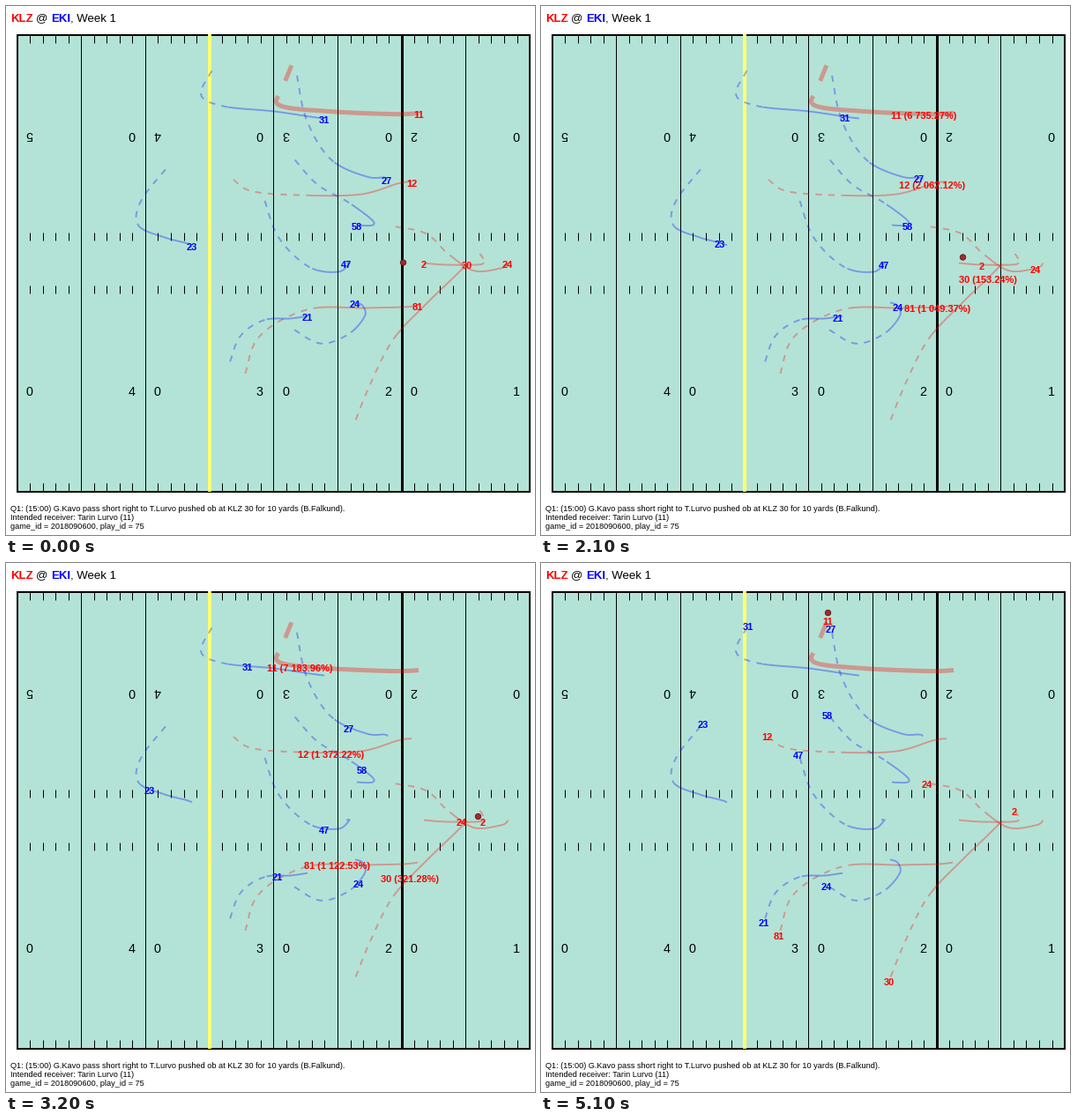
Recreate the animation shown at these times as a matplotlib script. Size 600 by 600 pixels, loop 6200 ms.

```python
import numpy as np
import matplotlib.pyplot as plt
from matplotlib.animation import FuncAnimation
from matplotlib.patches import Circle, Rectangle

SIZE, DPI = 600, 100
FRAMES, STEP = 62, 100
SNAP, START, THROW, LAST = 10, 12, 35, 51
KEYS = (START, 21, 28, 36, 44, LAST)    # steps of the players' key points
RED, BLUE = "#ff0000", "#0000ff"
GRASS, YELLOW, BROWN = "#b3e3d6", "#ffff73", "#a52a2a"
LEFT, RIGHT, TOP, BOTTOM = 12.5, 594, 33, 551
YARD = 14.54
LABEL_DROP = 1.5                        # labels sit a little below the track

plt.rcParams["font.family"] = "Liberation Sans"
fig = plt.figure(figsize=(SIZE / DPI, SIZE / DPI), dpi=DPI, facecolor="white")
ax = fig.add_axes([0, 0, 1, 1])
ax.set_xlim(0, SIZE)
ax.set_ylim(SIZE, 0)
ax.axis("off")


def pt(px):
    return px * 72 / DPI


def write(x, y, s, px, **kw):
    return ax.text(x, y, s, fontsize=pt(px), va="baseline", **kw)


def line(x, y, color="black", width=1, **kw):
    ax.plot(x, y, color=color, lw=pt(width),
            solid_capstyle="butt", dash_capstyle="butt", **kw)


def run(points, step):
    """Smooth run through the key points, from a standing start."""
    t, p = np.array(KEYS, float), np.array(points, float)
    m = np.gradient(p, t, axis=0)
    m[0] = 0
    q = np.clip(step, START, LAST)
    i = np.clip(np.searchsorted(t, q, side="right") - 1, 0, len(t) - 2)
    h = (t[i + 1] - t[i])[:, None]
    u = (q - t[i])[:, None] / h
    return (p[i] * (1 + 2 * u) * (1 - u) ** 2 + h * m[i] * u * (1 - u) ** 2
            + p[i + 1] * u * u * (3 - 2 * u) + h * m[i + 1] * u * u * (u - 1))


def draw_track(points, color, width):
    """Solid until the throw, dashed from there on."""
    for a, b, style in ((START, THROW, "-"),
                        (LAST - .7, THROW, (0, (3.8, 3.8)))):
        x, y = run(points, np.linspace(a, b, 120)).T
        line(x, y - LABEL_DROP, color, width, alpha=.33, ls=style, zorder=4)


def draw_field():
    ax.add_patch(Rectangle((LEFT, TOP), RIGHT - LEFT, BOTTOM - TOP, fc=GRASS,
                           ec="black", lw=pt(2), zorder=1))
    for k in range(1, 40):
        x = LEFT + YARD * k
        if k % 5:
            for a, b in ((TOP, 42), (257, 266), (317, 326), (541, BOTTOM)):
                line([x, x], [a, b], zorder=2)
        else:
            color, width = {15: (YELLOW, 4), 30: ("black", 3)}.get(
                k, ("black", 1))
            line([x, x], [TOP - (k == 15), BOTTOM], color, width, zorder=3)
    for i in range(4):
        x = 26.2 + 10 * YARD * i
        for mx, up, low in ((x, 5 - i, 0), (x + 8 * YARD, 0, 4 - i)):
            write(mx, 142, str(up), 14.2, ha="center", rotation=180,
                  rotation_mode="anchor", zorder=3)
            write(mx, 441.5, str(low), 14.2, ha="center", zorder=3)


def draw_words():
    write(5, 17.5, "KLZ", 13.2, color=RED, weight="bold")
    write(34, 17.5, "@", 13.2)
    write(51, 17.5, "EKI", 13.2, color=BLUE, weight="bold")
    write(73, 17.5, ", Week 1", 13.2)
    notes = (
        "Q1: (15:00) G.Kavo pass short right to T.Lurvo pushed ob at KLZ 30"
        " for 10 yards (B.Falkund).",
        "Intended receiver: Tarin Lurvo (11)",
        "game_id = 2018090600, play_id = 75",
    )
    for i, note in enumerate(notes):
        write(5, 573 + 10 * i, note, 9.2)


players = []


def add_player(number, color, *points, odds=None, width=1.9):
    draw_track(points, color, width)
    label = write(0, 0, number, 11, color=color, weight="bold", ha="center",
                  zorder=6 if color == RED else 7)
    players.append((label, number, run(points, np.arange(FRAMES)), odds))


draw_field()
draw_words()

add_player("11", RED, (468, 123), (434, 124), (366, 121), (310, 114),
           (314, 94), (325, 66), odds=(6435.62, 6735.27, 7183.96), width=5)
add_player("12", RED, (460, 201), (444, 203), (403, 215), (333, 216),
           (277, 211), (256, 197), odds=(1211.67, 2062.12, 1372.22))
add_player("30", RED, (523, 294), (507, 310), (477, 339), (439, 380),
           (412, 433), (395, 475), odds=(361.28, 153.24, 321.28))
add_player("81", RED, (467, 341), (450, 343), (408, 344), (341, 346),
           (286, 378), (270, 423), odds=(1991.42, 1049.37, 1122.53))
add_player("2", RED, (474, 293), (500, 295), (534, 295), (542, 292),
           (540, 286), (537, 282))
add_player("24", RED, (569, 293), (561, 299), (532, 302), (502, 283),
           (475, 259), (438, 251))
add_player("31", BLUE, (361, 129), (345, 127), (304, 121), (246, 115),
           (221, 101), (235, 72))
add_player("27", BLUE, (432, 198), (429, 196), (409, 195), (368, 175),
           (340, 128), (329, 75))
add_player("58", BLUE, (398, 250), (416, 250), (415, 244), (388, 224),
           (352, 203), (325, 173))
add_player("47", BLUE, (386, 293), (389, 294), (377, 303), (343, 297),
           (308, 262), (292, 218))
add_player("24", BLUE, (396, 338), (405, 342), (407, 353), (388, 374),
           (355, 384), (324, 367))
add_player("21", BLUE, (342, 353), (337, 354), (322, 356), (292, 358),
           (265, 377), (253, 408))
add_player("23", BLUE, (211, 273), (203, 270), (180, 264), (150, 250),
           (154, 221), (184, 183))

# Snap, drop back, throw, catch.
ball_keys = (SNAP, 21, 28, 36, 44, 47, LAST)
ball_x = (450.5, 478.5, 518.5, 552.5, 383.5, 321, 325.5)
ball_y = (291, 285, 286, 289, 130.5, 82, 56.5)
ball = ax.add_patch(Circle((0, 0), 3.2, fc=BROWN, ec="#5c1a1a",
                           lw=pt(.9), zorder=8))


def update(n):
    for label, number, path, odds in players:
        x, y = path[n]
        label.set_position((x, y + 4))
        text = number
        if odds and SNAP <= n < THROW:
            value = np.interp(n, (14, 21, 28), odds)
            text += f" ({value:,.2f}%)".replace(",", " ")
        label.set_text(text)
    ball.set_center((np.interp(n, ball_keys, ball_x),
                     np.interp(n, ball_keys, ball_y)))
    return [p[0] for p in players] + [ball]


anim = FuncAnimation(fig, update, frames=FRAMES, interval=STEP, repeat=True,
                     repeat_delay=0, init_func=lambda: update(0))
plt.show()
```
